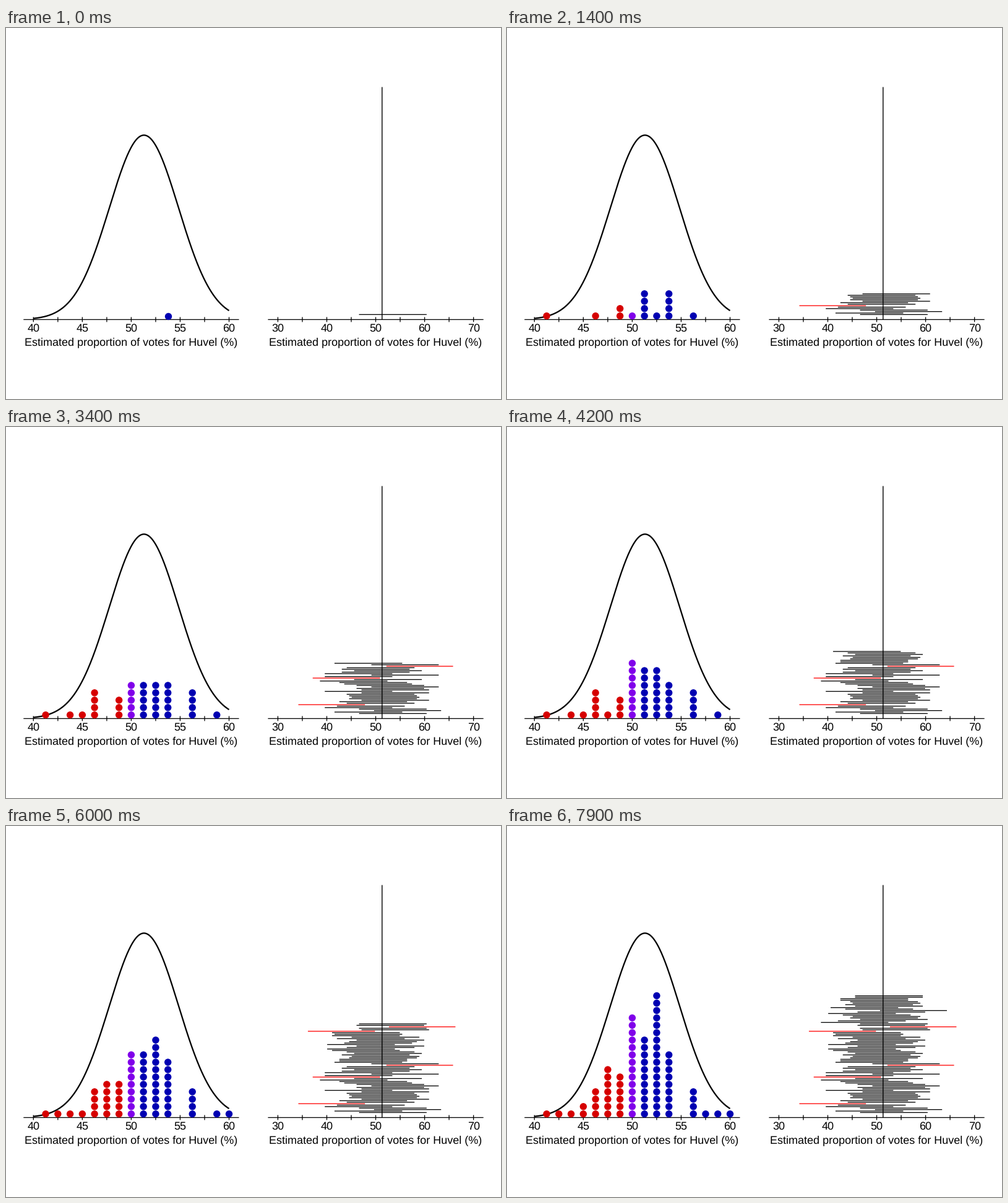
These frames come from a looping animation (800x600 px, 8000 ms). A matplotlib script:

```python
import numpy as np
import matplotlib.pyplot as plt
from matplotlib.animation import FuncAnimation
from matplotlib.collections import LineCollection

plt.rcParams["font.family"] = "Liberation Sans"
plt.rcParams["text.hinting"] = "none"

W, H, DPI = 800, 600, 100
PX = 72 / DPI              # points per pixel
TRUE, N = 51.3, 200        # true share (%) and poll size
BASE = 471.5               # y of both axes
RED, PURPLE, BLUE = "#d60000", "#8000ea", "#0000b2"

# Poll results in votes out of 200, in order of drawing
VOTES = np.array([
    107, 97, 113, 107, 93, 98, 82, 102, 99, 108,
    103, 104, 103, 102, 108, 93, 108, 106, 112, 106,
    101, 99, 91, 105, 88, 93, 112, 93, 100, 105,
    100, 102, 118, 112, 97, 99, 99, 103, 104, 100,
    105, 102, 96, 94, 102, 106, 94, 101, 103, 106,
    98, 104, 96, 97, 96, 86, 108, 107, 119, 106,
    107, 91, 98, 107, 103, 104, 100, 94, 106, 115,
    101, 95, 105, 101, 104, 103, 99, 99, 105, 105,
])


def left_x(v):
    return 44.3 + (v - 40) * 15.81


def right_x(v):
    return 439.4 + (v - 30) * 7.905


fig = plt.figure(figsize=(W / DPI, H / DPI), dpi=DPI, facecolor="white")
ax = fig.add_axes([0, 0, 1, 1])
ax.set_xlim(0, W)
ax.set_ylim(H, 0)
ax.axis("off")


def stroke(x, y, width, z=2):
    ax.plot(x, y, color="black", lw=width * PX, snap=False,
            solid_capstyle="butt", zorder=z)


def label(x, y, text):
    ax.text(x, y, text, fontsize=18 * PX, ha="center", va="baseline")


def draw_axis(to_x, first, step):
    ticks = to_x(first + step / 2 * np.arange(9))
    stroke([ticks[0] - 16, ticks[-1] + 16], [BASE, BASE], 1.3)
    for i, x in enumerate(ticks):
        stroke([x, x], [BASE - 4, BASE + 4], 1.3)
        if i % 2 == 0:
            label(x, 490.4, str(first + step * i // 2))
    label(ticks[4], 512.8, "Estimated proportion of votes for Huvel (%)")


draw_axis(left_x, 40, 5)
draw_axis(right_x, 30, 10)

# Sampling distribution
sd = 100 * np.sqrt(TRUE / 100 * (1 - TRUE / 100) / N)
v = np.linspace(40, 60, 300)
stroke(left_x(v), BASE - 298.2 * np.exp(-((v - TRUE) / sd) ** 2 / 2), 2.3)

# True value
stroke([right_x(TRUE)] * 2, [95.5, BASE], 1.4, z=4)

# Stacked dots
share = VOTES / N
bins = np.round(100 * share / 1.25).astype(int)
stack = np.array([np.sum(bins[:i] == b) for i, b in enumerate(bins)])
dots_xy = np.column_stack([left_x(bins * 1.25), 465.7 - 11.95 * stack])
dot_colors = [RED if b < 40 else PURPLE if b == 40 else BLUE for b in bins]

# 95% confidence intervals
half = 196 * np.sqrt(share * (1 - share) / N)
lo, hi = 100 * share - half, 100 * share + half
row_y = 463.4 - 2.39 * np.arange(len(VOTES))
bars = [[(right_x(a), y), (right_x(b), y)] for a, b, y in zip(lo, hi, row_y)]
bar_colors = ["black" if a < TRUE < b else "red" for a, b in zip(lo, hi)]

dots = ax.scatter([], [], s=(11.4 * PX) ** 2, linewidths=0, zorder=3)
lines = LineCollection([], linewidths=1.3 * PX, capstyle="butt", zorder=3)
lines.set_snap(False)
ax.add_collection(lines)


def update(frame):
    n = frame + 1
    dots.set_offsets(dots_xy[:n])
    dots.set_facecolor(dot_colors[:n])
    lines.set_segments(bars[:n])
    lines.set_color(bar_colors[:n])
    return dots, lines


anim = FuncAnimation(fig, update, frames=len(VOTES), interval=100,
                     repeat=True, repeat_delay=0)
plt.show()
```
